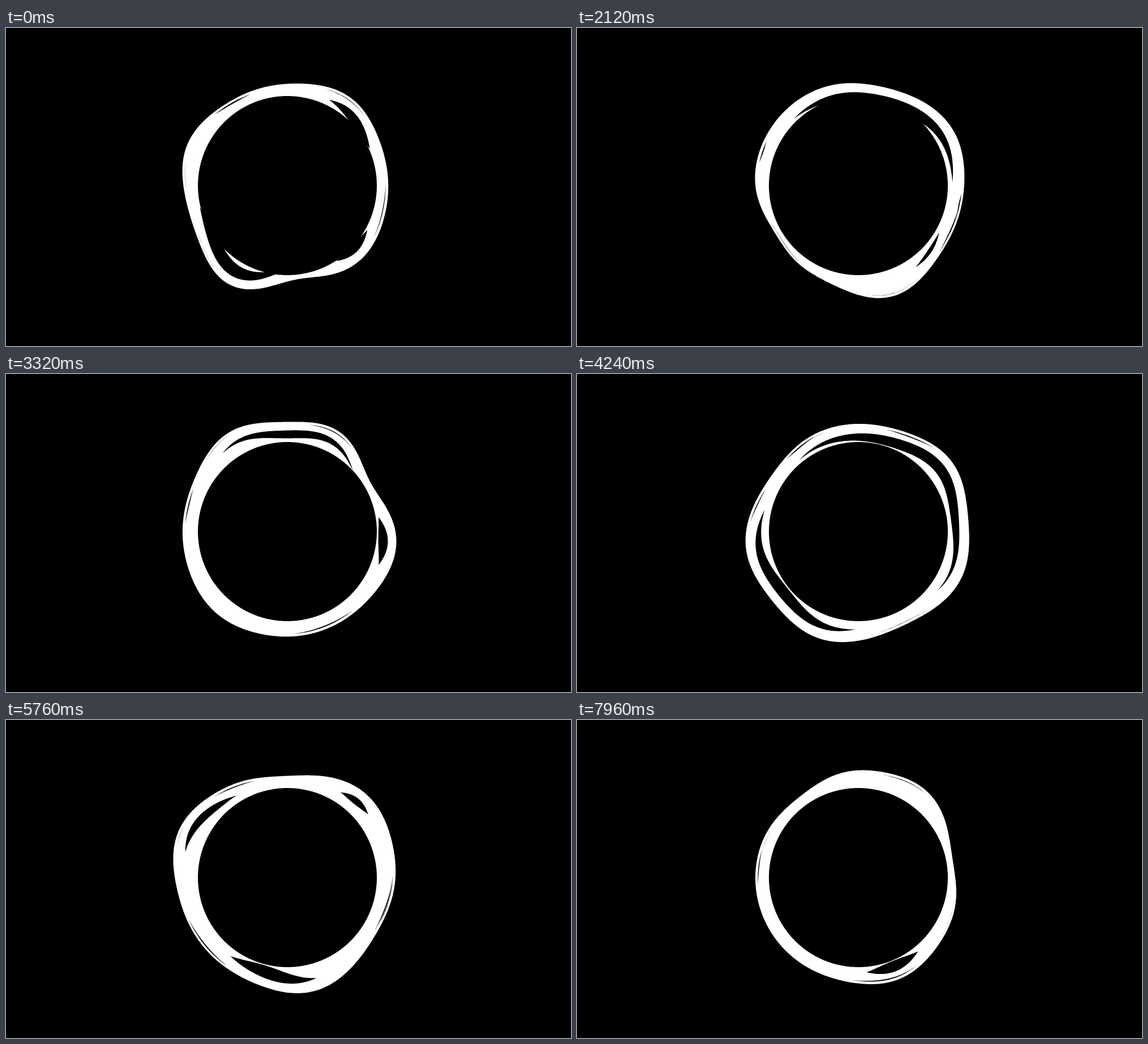
An HTML page with a canvas for the animation above (8 s loop, 998 px wide and 561 px high).

```html
<!DOCTYPE html>
<html lang="en">
<head>
<meta charset="utf-8">
<title>Fluid ring</title>
<style>
  html, body { margin: 0; width: 100%; height: 100%; overflow: hidden; background: #000; }
  canvas { display: block; }
</style>
</head>
<body>
<canvas id="stage" width="998" height="561"></canvas>
<script>
const ctx = document.getElementById('stage').getContext('2d');
const CX = 497, CY = 278, INNER = 158, RIBBON = 15, LOBE_WIDTH = 24;
const LOOP = 8000, STEP = 40, RAD = Math.PI / 180;

// Angles run clockwise from the right.
// lobes: [angle, height] swells and dents; gaps: [from, to, depth] openings under the outer ribbon
const poses = [
  { time: 0, base: 178,
    lobes: [[45, 7], [85, -15], [120, 26], [202, 13], [305, 13]],
    gaps: [[29, 57, 14], [92, 166, 23], [296, 336, 17]] },
  { time: 2120, base: 185,
    lobes: [[72, 20], [112, -8], [150, -15], [282, -6], [330, 9]],
    gaps: [[30, 55, 7], [226, 358, 20]] },
  { time: 3320, base: 185,
    lobes: [[8, 10], [132, 6], [240, 18], [297, 17], [328, -18]],
    gaps: [[-9, 20, 17], [230, 317, 14]] },
  { time: 4240, base: 190,
    lobes: [[23, 10], [64, -7], [112, 11], [170, 11], [215, -8], [323, 16]],
    gaps: [[92, 193, 20], [230, 397, 19]] },
  { time: 5760, base: 192,
    lobes: [[30, -7], [78, 14], [203, 17], [268, -13], [315, 11]],
    gaps: [[74, 126, 22], [194, 238, 14], [302, 322, 12]] },
  { time: 6960, base: 188,
    lobes: [[26, 24], [54, 10], [217, -19], [278, 14], [322, -13]],
    gaps: [[24, 48, 16], [64, 118, 8]] },
  { time: 7960, base: 182,
    lobes: [[68, 11], [235, -7], [265, 7], [306, 13], [350, -13]],
    gaps: [[51, 85, 19]] }
];

const mix = (a, b, u) => a + (b - a) * u;
const random = seed => {
  const x = Math.sin(seed * 127.1 + 3.7) * 43758.5453;
  return x - Math.floor(x);
};

function poseRadius({ base, lobes }, deg) {
  return lobes.reduce((r, [angle, height]) => {
    const turn = ((deg - angle) % 360 + 540) % 360 - 180;
    return r + height * Math.exp(-((turn / LOBE_WIDTH) ** 2));
  }, base);
}

function arc(from, to, radius) {
  const n = Math.ceil(to - from);
  return Array.from({ length: n + 1 }, (_, i) => {
    const deg = mix(from, to, i / n);
    return [deg, radius(deg, Math.sin(Math.PI * i / n))];
  });
}

function fillPolar(points, color) {
  ctx.beginPath();
  for (const [deg, r] of points)
    ctx.lineTo(CX + r * Math.cos(deg * RAD), CY + r * Math.sin(deg * RAD));
  ctx.fillStyle = color;
  ctx.fill();
}

// black lens that hangs below the outline, pointed at both ends
function cutLens(edge, from, to, inset, dip, depth) {
  const upper = (deg, swell) => edge(deg) - inset - dip * (1 - swell);
  const lower = (deg, swell) => upper(deg, swell) - depth * swell;
  fillPolar([...arc(from, to, upper), ...arc(from, to, lower).reverse()], '#000');
}

function cutGaps(pose, edge, open) {
  if (open <= 0) return;
  for (const [from, to, depth] of pose.gaps)
    cutLens(edge, from, to, RIBBON, 6, depth * open);
}

// fine dark hairs that come and go along the rim
function cutHairs(edge, seconds) {
  for (let i = 0; i < 10; i++) {
    const from = random(i) * 360 + 6 * Math.sin(seconds + i);
    const length = 12 + 25 * random(i + 20);
    const width = 2 * Math.sin(1.3 * seconds + 6.3 * random(i + 40));
    if (width > 0) cutLens(edge, from, from + length, 3 + 2 * random(i + 60), 0, width);
  }
}

function draw(now) {
  let k = 0;
  while (k < poses.length - 2 && now >= poses[k + 1].time) k++;
  const a = poses[k], b = poses[k + 1];
  const u = (now - a.time) / (b.time - a.time);
  const seconds = now / 1000, between = Math.sin(Math.PI * u);
  const edge = deg => {
    const ripple = 5 * Math.sin(3 * deg * RAD + 2.1 * seconds) + 4 * Math.sin(5 * deg * RAD - 2.7 * seconds);
    return Math.max(INNER + 4, mix(poseRadius(a, deg), poseRadius(b, deg), u) + between * ripple);
  };

  ctx.fillStyle = '#000';
  ctx.fillRect(0, 0, 998, 561);
  fillPolar(arc(0, 360, edge), '#fff');
  fillPolar(arc(0, 360, () => INNER), '#000');
  cutGaps(a, edge, 1 - u / 0.65);
  cutGaps(b, edge, 1 - (1 - u) / 0.65);
  cutHairs(edge, seconds);
}

function tick() {
  draw(Math.floor(performance.now() % LOOP / STEP) * STEP);
  requestAnimationFrame(tick);
}
tick();
</script>
</body>
</html>
```
